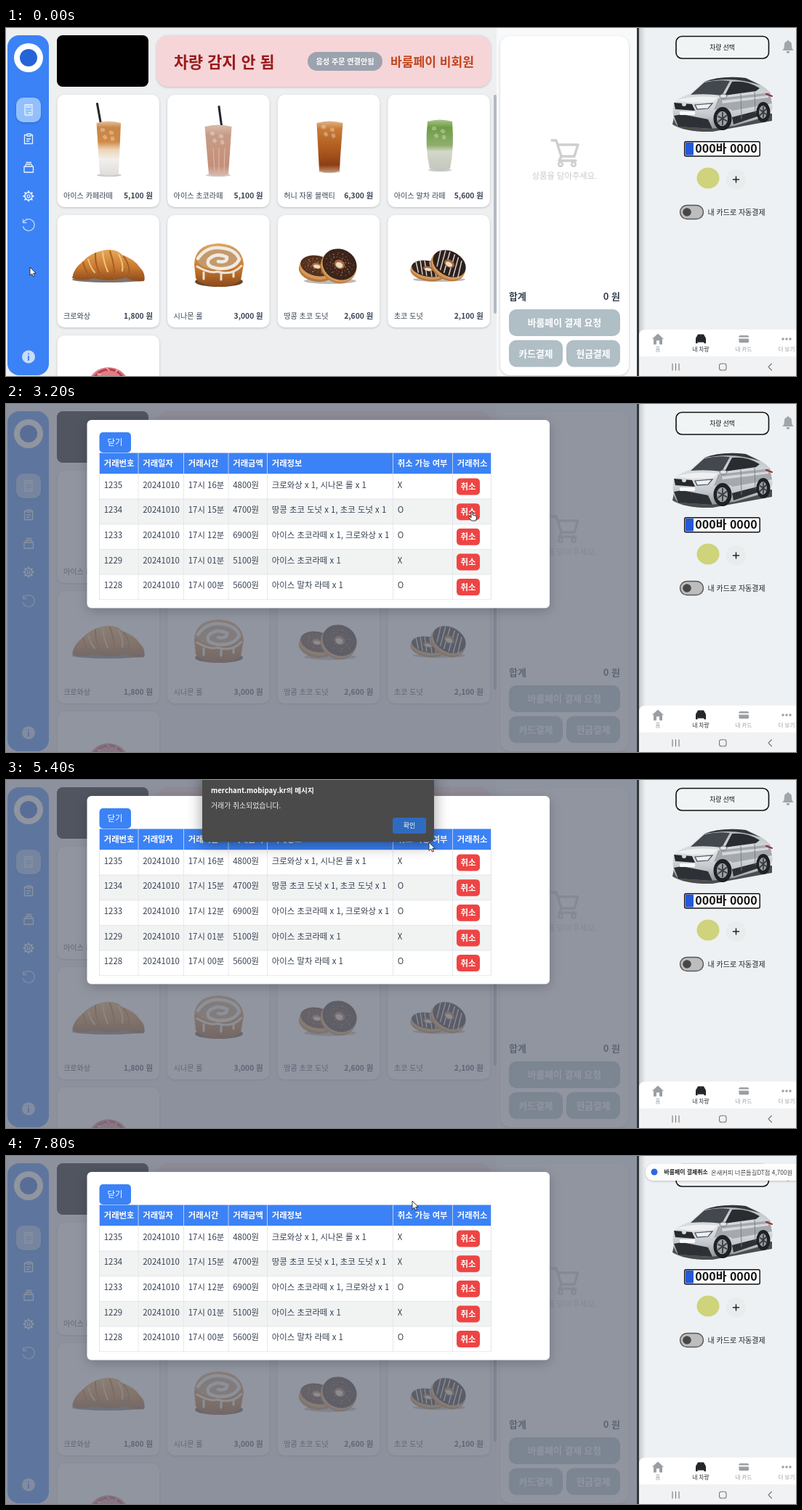
These frames come from a looping animation (1087 by 480 pixels, 8 s). An HTML page:

```html
<!DOCTYPE html>
<html lang="ko">
<head>
<meta charset="utf-8">
<title>결제 취소</title>
<style>
html, body { margin: 0; width: 100%; height: 100%; overflow: hidden; background: #eeeff1; }
svg { display: block; width: 100vw; height: 100vh; font-family: "Noto Sans CJK KR", "Noto Sans CJK", "Noto Sans", sans-serif; }
.card { filter: drop-shadow(0 1px 1.5px #0003); }
.panel { filter: drop-shadow(0 4px 8px #0003); }
.dialog { filter: drop-shadow(0 4px 10px #0006); }
.line { fill: none; stroke-linecap: round; stroke-linejoin: round; }

/* 8 s loop, one step per 200 ms = 2.5 % */
.step { animation: 8s step-end infinite; }
#cursor { animation-name: move; }
#arrow { animation-name: arrow; }
#hand { animation-name: hand; }
#modal { animation-name: modal; }
#status { animation-name: status; }
#alert { animation-name: alert; }
#before { animation-name: before; }
#after { animation-name: after; }
#toast { animation-name: toast; }
#toastText { animation-name: toastText; }
@keyframes move {
  0% { transform: translate(33px, 330px); }
  2.5% { transform: translate(33px, 327px); }
  5% { transform: translate(33px, 312px); }
  7.5% { transform: translate(32px, 292px); }
  10% { transform: translate(32px, 277px); }
  17.5% { transform: translate(58px, 271px); }
  20% { transform: translate(140px, 248px); }
  22.5% { transform: translate(255px, 215px); }
  25% { transform: translate(365px, 186px); }
  27.5% { transform: translate(446px, 167px); }
  30% { transform: translate(508px, 163px); }
  32.5% { transform: translate(573px, 158px); }
  35% { transform: translate(624px, 153px); }
  37.5% { transform: translate(638px, 150px); }
  40% { transform: translate(641px, 148px); }
  60% { transform: translate(636px, 144px); }
  62.5% { transform: translate(622px, 128px); }
  65% { transform: translate(603px, 107px); }
  67.5% { transform: translate(582px, 86px); }
  70% { transform: translate(566px, 70px); }
  72.5%, 100% { transform: translate(559px, 62px); }
}
@keyframes arrow { 0% { opacity: 1; } 35% { opacity: 0; } 60%, 100% { opacity: 1; } }
@keyframes hand { 0% { opacity: 0; } 35% { opacity: 1; } 60%, 100% { opacity: 0; } }
@keyframes modal { 0% { opacity: 0; } 15%, 100% { opacity: 1; } }
@keyframes status { 0% { opacity: 0; } 10% { opacity: 1; } 17.5%, 100% { opacity: 0; } }
@keyframes alert {
  0% { opacity: 0; transform: translate(0, -6px); }
  52.5% { opacity: .76; transform: translate(0, -6px); }
  55% { opacity: 1; transform: none; }
  75%, 100% { opacity: 0; transform: none; }
}
@keyframes before { 0% { opacity: 1; } 75%, 100% { opacity: 0; } }
@keyframes after { 0% { opacity: 0; } 75%, 100% { opacity: 1; } }
@keyframes toast {
  0% { opacity: 0; transform: translate(2.5px, 0); }
  77.5% { opacity: .95; transform: translate(2.5px, 0); }
  80%, 100% { opacity: 1; transform: none; }
}
@keyframes toastText { 0% { opacity: .4; } 80%, 100% { opacity: 1; } }
</style>
</head>
<body>
<svg id="stage" viewBox="0 0 1087 480" preserveAspectRatio="none">
  <defs id="defs"></defs>
</svg>
<script>
const BLUE = '#3b82f6', INK = '#374151', MUTED = '#b0bec5';

const text = (x, mid, str, size, fill, attrs = '') =>
  `<text x="${x}" y="${mid + size * .365}" font-size="${size}" fill="${fill}" ${attrs}>${str}</text>`;
const rect = (x, y, w, h, r, fill, attrs = '') =>
  `<rect x="${x}" y="${y}" width="${w}" height="${h}" rx="${r}" fill="${fill}" ${attrs}/>`;
const path = (d, fill, attrs = '') => `<path d="${d}" fill="${fill}" ${attrs}/>`;
const line = (d, color, width = 1.3) =>
  `<path class="line" d="${d}" stroke="${color}" stroke-width="${width}"/>`;
const oval = (x, y, rx, ry, fill, attrs = '') =>
  `<ellipse cx="${x}" cy="${y}" rx="${rx}" ry="${ry}" fill="${fill}" ${attrs}/>`;
const step = (id, content) => `<g id="${id}" class="step">${content}</g>`;
const gradient = (id, ...stops) => `<linearGradient id="${id}" x2="0" y2="1">${
  stops.map(([at, color]) => `<stop offset="${at}" stop-color="${color}"/>`).join('')}</linearGradient>`;
const BOLD = 'font-weight="700"', MEDIUM = 'font-weight="500"', MID = 'text-anchor="middle"', END = 'text-anchor="end"';

defs.innerHTML =
  gradient('latte', [0, '#e3c39d'], [.12, '#c98647'], [.38, '#d08a48'], [.52, '#ecd3b6'], [.7, '#f2efeb'], [1, '#dfdddb']) +
  gradient('choco', [0, '#d9bcae'], [.2, '#c89b86'], [.8, '#c48f79'], [1, '#d9bdb0']) +
  gradient('tea', [0, '#dfb489'], [.15, '#c97b36'], [.6, '#a9551d'], [.85, '#8c3f14'], [1, '#c99873']) +
  gradient('matcha', [0, '#a9c588'], [.15, '#6f9c45'], [.5, '#8fae6c'], [.62, '#d3d8c8'], [1, '#c3c6bd']) +
  gradient('pastry', [0, '#e6a75a'], [.55, '#c97a31'], [1, '#8a4a1b']) +
  gradient('body', [0, '#b3b7bc'], [.45, '#dfe2e5'], [.75, '#c3c7cb'], [1, '#8f9499']) +
  `<linearGradient id="edge"><stop stop-color="#8d9194"/><stop offset="1" stop-color="#edf1f3"/></linearGradient>`;

function sidebar() {
  const white = '#eaf2ff';
  const teeth = [...Array(8)].map((_, i) => {
    const a = i * Math.PI / 4, c = Math.cos(a), s = Math.sin(a);
    return `M${31 + 5 * c} ${232 + 5 * s}L${31 + 6.6 * c} ${232 + 6.6 * s}`;
  }).join('');
  return rect(2, 10, 57, 469, 16, BLUE) +
    oval(31, 41, 20, 20, '#fff') + oval(31, 41, 12, 12, '#2563d8') +
    rect(14, 96, 34, 34, 10, '#93c0fd', 'class="card"') +
    line('M26 106h10v14h-10zM28 109h6M28 113h.1M31 113h.1M34 113h.1M28 117h.1M31 117h3', white) +
    line('M28 147.500h-2.500v12h11v-12h-2.500M29 146h5v3h-5zM28.500 153h5M28.500 156h3', white) +
    line('M25 191h12.500v8h-12.500zM26 191l1.500-3h7.500l1.500 3M28 185.500h6.500', white) +
    line(teeth, white, 2.2) +
    `<circle class="line" cx="31" cy="232" r="5.3" stroke="${white}" stroke-width="1.3"/>` +
    `<circle class="line" cx="31" cy="232" r="2" stroke="${white}" stroke-width="1.2"/>` +
    line('M24 268a8 8 0 1 1-.5 6M23.500 264v4.500h4.500', '#b9d4fb', 1.3) +
    oval(31, 453.5, 9, 9, '#c8dcfa') + line('M31 453v5M31 449.500v.1', BLUE, 2);
}

function banner() {
  return rect(70, 10, 126, 71, 8, '#000') +
    rect(207, 10, 460, 71, 16, '#f6d5d8', 'class="card"') +
    text(231, 47, '차량 감지 안 됨', 21.8, '#991b1b', BOLD) +
    rect(415, 33, 103, 26, 13, '#9ca3af') +
    text(466.5, 46.5, '음성 주문 연결안됨', 10.1, '#fff', `${BOLD} ${MID}`) +
    text(529, 46.5, '바룸페이 비회원', 17.1, '#c2451c', BOLD);
}

const ice = (x, y) => [[-8, 0], [5, 4], [-3, 11], [8, 14]].map(([dx, dy], i) =>
  rect(x + dx - 3, y + dy, 6, 5, 1.5, '#fff', `opacity=".3" transform="rotate(${i * 25} ${x + dx} ${y + dy})"`)).join('');

// Ring cake: dough below, glaze above, an optional topping inside the tilt
const donut = (x, y, rx, ry, depth, tilt, glaze, topping = '') =>
  `<g transform="translate(${x} ${y}) rotate(${tilt})">` +
  oval(0, depth, rx, ry, '#b9783c') + oval(0, depth / 2, rx, ry, '#d39a58') +
  oval(0, 0, rx - 1, ry - 1, glaze) + topping +
  oval(0, 0, rx * .3, ry * .28, '#a86a35') + oval(0, 1, rx * .2, ry * .17, '#e9dccd') + '</g>';

const stripes = (rx, ry) => line([-.65, -.4, -.15, .15, .4, .65].map(k => {
  const h = ry * Math.sqrt(1 - k * k) * .8;
  return `M${rx * k - 3} ${-h}L${rx * k + 3} ${h}`;
}).join(''), '#d8d0ca', 1.5);

const sprinkles = (rx, ry) => [...Array(44)].map((_, i) => {
  const a = i * 2.4, r = .4 + (i % 9) / 18;
  return oval(rx * r * Math.cos(a), ry * r * Math.sin(a), .8, .8, i % 3 ? '#8a5136' : '#b98a62');
}).join('');

const photos = [
  oval(142, 203, 17, 2, '#ccc') + line('M125.500 104.500L131 135', '#23252d', 3) +
    path('M124.500 131Q141 126 158 131L155 201Q142 206 129 201z', 'url(#latte)') + ice(141, 138),
  oval(292, 203, 17, 2, '#ccc') + line('M293 108.500L297 138', '#23252d', 3) +
    path('M273.500 136Q292 131 310.500 136L306 202Q292 207 279 202z', 'url(#choco)') + ice(292, 143) +
    line('M285 166L287 198M293 166V199M301 166L300 198', '#ddbcae', 1),
  oval(445, 198, 15, 2, '#ccc') +
    path('M427.500 131Q445 126 463.500 131L460 178L459 197Q445 202 431 197L430 178z', 'url(#tea)') + ice(445, 134),
  oval(597, 196, 16, 2, '#ccc') +
    path('M580 129Q597 124 614 129Q617 165 611 194Q597 200 583 194Q576 165 580 129z', 'url(#matcha)') + ice(597, 136),
  oval(141, 347, 50, 4, '#3a2a20', 'opacity=".65"') +
    path('M91 345Q93 331 106 322Q116 310 133 307Q150 303 160 313Q177 319 184 330Q193 339 190 349Q176 351 165 344Q142 351 121 345Q105 350 91 345z', 'url(#pastry)') +
    line('M106 323Q109 336 116 343M123 311Q122 328 132 345M143 308Q150 327 149 345M162 315Q172 329 169 342', '#a65b22', 2) +
    line('M113 319Q117 332 122 337M133 309Q134 322 140 336M155 312Q162 325 160 335', '#f0c481', 2),
  oval(293, 350, 33, 7, '#6b4528') +
    path('M259 326Q260 298 293 297Q325 299 327 326L323 348Q311 358 290 357Q266 354 261 345z', 'url(#pastry)') +
    oval(293, 317, 31, 17, '#c49a6c') +
    line('M264 318Q275 302 292 303Q316 304 321 319Q315 332 295 332Q273 330 279 319Q289 309 304 316Q305 324 292 322', '#f1eae0', 4.5) +
    line('M263 329Q280 339 291 336Q311 342 324 328M272 337v9M296 339v8M313 336v7', '#eee3d3', 3),
  oval(446, 349, 36, 4, '#bbb') +
    donut(428, 328, 24, 15, 7, 12, '#54301f', sprinkles(22, 13)) +
    donut(459, 326, 25, 22, 4, 25, '#3b241b', sprinkles(23, 20)),
  oval(596, 347, 36, 3, '#bbb') +
    donut(581, 332, 24, 12, 5, 10, '#302421', stripes(24, 12)) +
    donut(610, 325, 25, 18, 5, 28, '#2b201e', stripes(25, 18)),
  oval(141, 491, 27, 23, '#e07f83') + line('M122 481Q130 470 144 471Q156 473 161 483', '#b9404b', 3) +
    line('M126 477l4 1M139 470l3 2M151 474l2-2', '#f4c9cc', 1.5),
];

const products = [
  ['아이스 카페라떼', '5,100'], ['아이스 초코라떼', '5,100'], ['허니 자몽 블랙티', '6,300'], ['아이스 말차 라떼', '5,600'],
  ['크로와상', '1,800'], ['시나몬 롤', '3,000'], ['땅콩 초코 도넛', '2,600'], ['초코 도넛', '2,100'], ['', ''],
];

const shelf = () => products.map(([name, price], i) => {
  const x = 70.5 + i % 4 * 151.6, y = 92 + Math.floor(i / 4) * 166;
  return rect(x, y, 140.5, 155, 10, '#fff', 'class="card"') + photos[i] +
    text(x + 8.5, y + 139.5, name, 10.1, INK) +
    (price && text(x + 131.5, y + 139.5, price + ' 원', 10.3, INK, `${BOLD} ${END}`));
}).join('') + rect(671, 92, 4, 302, 2, '#b3b9c0');

function basket() {
  const button = (x, y, w, label) => rect(x, y, w, 37, 10, MUTED) +
    text(x + w / 2, y + 18.5, label, 12.8, '#fff', `${BOLD} ${MID}`);
  return rect(675, 0, 194, 480, 0, '#f8f9fa') + rect(680, 11, 177, 468, 14, '#fff', 'class="card"') +
    line('M751 155h6l7 22h18l5-16h-27M764 177l-3 6h23', '#cfcfcf', 3.4) +
    `<g fill="none" stroke="#cfcfcf" stroke-width="2.5"><circle cx="763" cy="188" r="2.7"/><circle cx="781" cy="188" r="2.7"/></g>` +
    text(768.5, 204, '상품을 담아주세요.', 11.3, '#c8c8c8', MID) +
    text(692, 370, '합계', 13, INK, BOLD) + text(845, 370, '0 원', 13, INK, `${BOLD} ${END}`) +
    button(692, 388, 153, '바룸페이 결제 요청') + button(692, 430.5, 74, '카드결제') + button(771, 430.5, 74, '현금결제');
}

function car() {
  const wheel = (x, y, rx, ry) => oval(x, y, rx + 2, ry + 2, '#1f2124') + oval(x - .5, y, rx * .72, ry * .74, '#9da1a6') +
    line(`M${x} ${y - ry * .6}V${y + ry * .6}M${x - rx * .55} ${y - 3}L${x + rx * .5} ${y + 3}M${x - rx * .55} ${y + 4}L${x + rx * .5} ${y - 4}`, '#3a3d42', 1.8);
  return path('M917 133Q935 144 972 143L1054 128V118H920z', '#4b4d50') +
    path('M918 106Q922 96 942 91L961 74Q985 65 1018 69Q1040 77 1051 88L1055 110L1050 121L1002 135L970 139L925 136Q916 128 918 106z', 'url(#body)') +
    path('M942 92L961 75Q980 71 996 73L985 93Q963 90 942 92z', '#43484f') +
    path('M989 93L999 74Q1020 72 1037 83L1032 87z', '#292c30') +
    path('M961 74Q985 65 1018 69L1038 79Q1006 68 977 72z', '#34373b') +
    path('M922 100Q945 92 980 96L972 102L944 103z', '#eef0f2') +
    path('M980 97L1051 89L1054 104L1000 114Q990 108 974 113z', '#a4a9ae') +
    path('M985 100L1049 93L1049 96L986 104z', '#d5d8db') +
    path('M919 103L944 105L948 114L921 112z', '#27292d') +
    path('M919 121L930 119L966 126L972 139L925 136z', '#2d3034') +
    path('M999 123L1034 114V122L1001 133z', '#2d3034') +
    path('M948 106L972 104L966 111L951 112z', '#e9f1f8', 'stroke="#4a4d52" stroke-width="1.2"') +
    line('M1011 91L1012 125M1030 87L1031 117', '#777c82', .9) +
    rect(927, 115, 21, 5, 1, '#f8f8f8') + oval(933, 105, 3, 3, '#d5d8dc') +
    oval(987, 94, 5, 3, '#e0e2e5', 'stroke="#55585c" stroke-width=".8"') +
    line('M1046 91L1054 94', '#8c2f30', 2) +
    wheel(986, 125, 10.5, 14) + wheel(1042, 116, 7.5, 12);
}

function phone() {
  const gray = '#9b9fa3', dark = '#25282b';
  const tab = (x, label, color) => text(x, 443.5, label, 7.5, color, MID);
  return rect(868, 0, 219, 480, 0, '#edf1f3') + rect(868, 0, 12, 480, 0, 'url(#edge)', 'opacity=".55"') +
    rect(868, 0, 3, 480, 0, '#34373b') +
    rect(922, 11.5, 127.5, 30.5, 8, '#f1f4f5', 'stroke="#111" stroke-width="1.6"') +
    text(985.5, 27, '차량 선택', 8.7, '#111', `${MID} ${MEDIUM}`) +
    path('M1068 31Q1071 29 1071 23Q1071 19 1075 18V17h2v1Q1081 19 1081 23Q1081 29 1084 31zM1073.500 32h5q-.5 3-2.500 3t-2.500-3z', '#a2a6aa') +
    car() +
    rect(933.7, 156.7, 103.5, 20, 2, '#fff', 'stroke="#111" stroke-width="1.5"') + rect(935, 158, 11, 17.5, 1, '#2458d8') +
    text(991, 166.5, '000바 0000', 16, '#111', `${BOLD} ${MID}`) +
    oval(966, 207, 15.5, 14.5, '#ced37c') +
    oval(1004.5, 209, 14, 14, '#e9ecec') + line('M1000.500 209h8M1004.500 205v8', '#222', 1.5) +
    rect(927.5, 244.5, 32, 19, 9.5, '#bdbdbd', 'stroke="#555" stroke-width="1.4"') + oval(937, 254, 5.8, 5.8, '#474747') +
    text(965.5, 254, '내 카드로 자동결제', 10, '#222') +
    path('M871 453V424Q871 416 880 416H1087V453z', '#fff') +
    path('M889 429L897 421.500L905 429H903V436.500H899V431H895V436.500H891V429z', gray) +
    path('M949 435V428L952 422.500H960L963 428V435H960.500V433.500H951.500V435z', dark) +
    rect(1008.5, 424, 13.5, 10, 1.5, gray) + rect(1008.5, 426.5, 13.5, 2, 0, '#fff') +
    [1069, 1074, 1079].map(x => oval(x, 429, 1.7, 1.7, gray)).join('') +
    tab(897, '홈', gray) + tab(956, '내 차량', dark) + tab(1015, '내 카드', gray) + tab(1074, '더 보기', gray) +
    rect(871, 453, 216, 27, 0, '#f1f2f3') +
    line('M917 463v9M921.500 463v9M926 463v9M1053.500 463l-4.500 4.500l4.500 4.500', '#777', 1.1) +
    rect(981.5, 463, 9.5, 9, 2.8, 'none', 'stroke="#777" stroke-width="1.1"');
}

function salesModal() {
  const cols = [128.5, 182, 244.5, 306, 359.5, 532.5, 614.5, 667.5], rowH = 34.65, top = 96.5;
  const heads = ['거래번호', '거래일자', '거래시간', '거래금액', '거래정보', '취소 가능 여부', '거래취소'];
  const sales = [
    ['1235', '16', '4800', '크로와상 x 1, 시나몬 롤 x 1', 'X'],
    ['1234', '15', '4700', '땅콩 초코 도넛 x 1, 초코 도넛 x 1', ''],
    ['1233', '12', '6900', '아이스 초코라떼 x 1, 크로와상 x 1', 'O'],
    ['1229', '01', '5100', '아이스 초코라떼 x 1', 'X'],
    ['1228', '00', '5600', '아이스 말차 라떼 x 1', 'O'],
  ];
  const rows = sales.map(([id, min, won, items, open], i) => {
    const y = top + i * rowH, mid = y + 15;
    const cells = [id, '20241010', `17시 ${min}분`, won + '원', items, open];
    return rect(128.5, y, 539, rowH, 0, i % 2 ? '#f1f3f3' : '#fff', 'stroke="#e1e4e8" stroke-width=".8"') +
      cells.map((s, c) => text(cols[c] + 6.3, mid, s, 11.4, INK)).join('') +
      rect(620, y + 6, 32, 23, 5, '#ef4444') + text(636, y + 17.5, '취소', 11.4, '#fff', `${BOLD} ${MID}`);
  }).join('');
  const changedY = top + rowH + 15;
  return rect(0, 0, 868, 480, 0, '#6b7280', 'opacity=".75"') +
    rect(111.5, 22, 636.5, 259.5, 6, '#fff', 'class="panel"') +
    rect(128.5, 39, 43.5, 28, 5, BLUE) + text(150, 53, '닫기', 11.4, '#fff', `${MEDIUM} ${MID}`) +
    rect(128.5, 67.5, 539, 29, 0, BLUE) + rows +
    heads.map((s, c) => text(cols[c] + 6.3, 82, s, 11.3, '#fff', BOLD)).join('') +
    line(cols.map(x => `M${x} 67.500V${top + 5 * rowH}`).join(''), '#e1e4e8', .8) +
    step('before', text(538.8, changedY, 'O', 11.4, INK)) + step('after', text(538.8, changedY, 'X', 11.4, INK));
}

const alertBox = () => rect(270, -10, 319, 95.5, 5, '#4a4a4a', 'class="dialog"') +
  text(282, 14, 'merchant.mobipay.kr의 메시지', 9.6, '#fff', BOLD) +
  text(282, 35, '거래가 취소되었습니다.', 9.9, '#f0f0f0') +
  rect(532, 52, 46, 22, 3, '#2f6bbf') + text(555, 63, '확인', 9, '#fff', MID);

const toastBox = () => rect(880, 10.5, 216, 23.5, 11, '#fdfdfd', 'class="card"') +
  step('toastText', oval(892, 22, 4.5, 4.5, '#2f67e0') +
    text(905.5, 22.5, '바룸페이 결제취소', 7.9, '#222', BOLD) +
    text(970, 22.5, '온새커피 너른들길DT점 4,700원', 8.3, '#444'));

const statusBar = () => rect(-4, 475, 156, 10, 3, '#1d1f22') +
  text(3, 481, 'merchant.mobipay.kr/main/sales', 9, '#ddd');

const pointer = () => {
  const outline = 'stroke="#222" stroke-width=".9" stroke-linejoin="round"';
  return step('arrow', path('M0 0V11.500L2.700 9L4.600 13L6.500 12.200L4.700 8.300H8.300z', '#fff', outline)) +
    step('hand', path('M-1 1Q0-.5 1 1V5L5 6Q7 6.500 6.500 9L5.500 13H-.5L-4 8.500Q-4 6.500-2.500 7.500L-1 9z', '#fff', outline));
};

stage.insertAdjacentHTML('beforeend',
  rect(0, 0, 1087, 480, 0, '#eeeff1') + sidebar() + banner() + shelf() + basket() +
  step('modal', salesModal()) + step('status', statusBar()) + step('alert', alertBox()) +
  phone() + step('toast', toastBox()) + step('cursor', pointer()));
</script>
</body>
</html>
```
